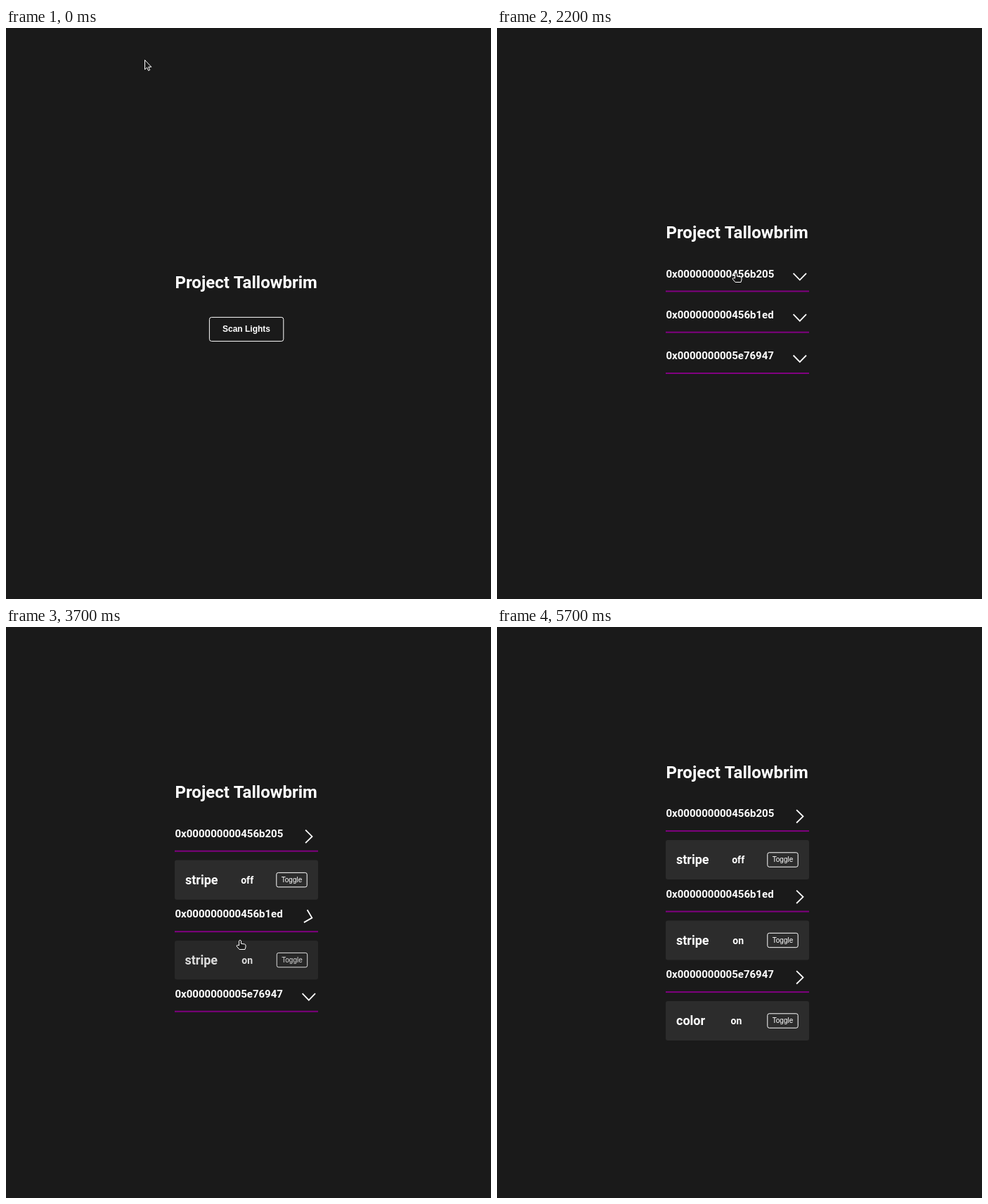
These frames come from a looping animation (690x812 px, 6.3 s). An HTML page with a canvas:

```html
<!DOCTYPE html>
<html lang="en">
<head>
<meta charset="utf-8">
<title>Light control panel</title>
<style>
  html, body { margin: 0; width: 100%; height: 100%; overflow: hidden; background: #1a1a1a; }
  canvas { display: block; }
</style>
</head>
<body>
<canvas id="stage" width="690" height="812"></canvas>
<script>
const ctx = document.getElementById('stage').getContext('2d');
const LOOP = 6300, STEP = 100, FADE = 400;
const HOVERED = 700, SCANNED = 1400;
const LEFT = 240, RIGHT = 444, TEXT_LEFT = LEFT + 0.5;
const LAST_LINE = 491, ROW = 58.3, PANEL_MIN = 50.2, PAD_MIN = 12, PAD_GROWTH = 3;
const BG = '#1a1a1a', WHITE = '#fff', ACCENT = '#800080', PANEL = '#2c2c2c';
const ROBOTO = 'Roboto, sans-serif';
const ARIAL = '"Liberation Sans", Arial, sans-serif';

const lights = [
  { id: '0x000000000456b205', effect: 'stripe', state: 'off', opens: 2450 },
  { id: '0x000000000456b1ed', effect: 'stripe', state: 'on', opens: 3485 },
  { id: '0x0000000005e76947', effect: 'color', state: 'on', opens: 4375 }
];

// Each glide takes the pointer from where it rests to x, y
const home = { x: 197, y: 45 };
const glides = [
  { from: 0, to: HOVERED, x: 311, y: 410 },
  { from: HOVERED, to: 1000, x: 322, y: 434, hand: true },
  { from: 1500, to: 1600, x: 313, y: 431 },
  { from: 1800, to: 2300, x: 341, y: 345, hand: true },
  { from: 2600, to: 3300, x: 335, y: 433, hand: true },
  { from: 3500, to: 4100, x: 320, y: 513, hand: true },
  { from: 4500, to: 4900, x: 111, y: 543 },
  { from: 5000, to: 5700, x: 104, y: -20 }
];

const clamp = v => Math.min(1, Math.max(0, v));
const mix = (a, b, k) => a + (b - a) * k;
const progress = (t, from, to) => clamp((t - from) / (to - from));
const easeInOut = k => k < 0.5 ? 4 * k ** 3 : 1 - 4 * (1 - k) ** 3;

// CSS "ease": cubic-bezier(.25, .1, .25, 1)
function ease(x) {
  if (x === 0 || x === 1) return x;
  const bezier = (a, b, s) => 3 * a * s * (1 - s) ** 2 + 3 * b * s * s * (1 - s) + s ** 3;
  let low = 0, high = 1;
  for (let i = 0; i < 20; i++) {
    const mid = (low + high) / 2;
    if (bezier(0.25, 0.25, mid) < x) low = mid; else high = mid;
  }
  return bezier(0.1, 1, low);
}

function text(str, x, y, font, color = WHITE, align = 'left') {
  ctx.font = font;
  ctx.fillStyle = color;
  ctx.textAlign = align;
  ctx.fillText(str, x, Math.round(y));
}

function roundBox(x, y, w, h, r) {
  ctx.beginPath();
  ctx.roundRect(x, y, w, h, r);
}

function outline(width, shape) {
  ctx.strokeStyle = WHITE;
  ctx.lineWidth = width;
  if (shape) ctx.stroke(shape); else ctx.stroke();
}

function drawTitle(y) {
  text('Project Tallowbrim', TEXT_LEFT, y, `700 24px ${ROBOTO}`);
}

function drawScanButton(t) {
  const hover = progress(t, HOVERED, HOVERED + 200);
  roundBox(289.4, 411.4, 105.4, 34, 3);
  ctx.globalAlpha = hover;
  ctx.fillStyle = WHITE;
  ctx.fill();
  ctx.globalAlpha = 1;
  outline(1);
  const shade = Math.round(mix(255, 26, hover));
  text('Scan Lights', 342, 432, `700 12px ${ARIAL}`, `rgb(${shade},${shade},${shade})`, 'center');
}

function drawChevron(y, open) {
  ctx.save();
  ctx.translate(430.8, y);
  ctx.rotate(-open * Math.PI / 2);
  ctx.beginPath();
  ctx.moveTo(-9.2, -4.7);
  ctx.lineTo(0, 4.7);
  ctx.lineTo(9.2, -4.7);
  outline(1.8);
  ctx.restore();
}

function drawPanel(light, top, height, open) {
  const pad = PAD_MIN + PAD_GROWTH * open, mid = top + height / 2;
  const buttonWidth = 43.4, buttonX = RIGHT - 0.8 - pad - buttonWidth;
  ctx.save();
  ctx.globalAlpha = open;
  roundBox(LEFT, top, RIGHT - LEFT, height, 3);
  ctx.fillStyle = PANEL;
  ctx.fill();

  text(light.effect, LEFT + pad, mid + 6, `700 18px ${ROBOTO}`);
  const effectEnd = LEFT + pad + ctx.measureText(light.effect).width;
  text(light.state, (effectEnd + buttonX) / 2, mid + 5, `700 14px ${ROBOTO}`, WHITE, 'center');

  roundBox(buttonX, mid - 10.2, buttonWidth, 20.4, 2.5);
  outline(1);
  text('Toggle', buttonX + buttonWidth / 2, mid + 3.4, `10px ${ARIAL}`, WHITE, 'center');
  ctx.restore();
}

// The list stays centred, so every panel lifts the first line by half its height
function drawList(t) {
  const rows = lights.map(light => {
    const open = ease(progress(t, light.opens, light.opens + FADE));
    return { light, open, height: open && PANEL_MIN + 2 * PAD_GROWTH * open };
  });
  let line = LAST_LINE - 2 * ROW - rows.reduce((sum, row) => sum + row.height, 0) / 2;
  drawTitle(line - 75.2);

  for (const { light, open, height } of rows) {
    text(light.id, TEXT_LEFT, line - 19.7, `700 15px ${ROBOTO}`);
    drawChevron(line - 20.8, open);
    ctx.fillStyle = ACCENT;
    ctx.fillRect(LEFT, line - 1, RIGHT - LEFT, 2);
    if (open) drawPanel(light, line + 12.8, height, open);
    line += ROW + height;
  }
}

const arrow = new Path2D('M.5 .5V14L3.6 11.2 5.6 15.6 7.7 14.7 5.8 10.4H9.8Z');
const hand = new Path2D('M-1.5 8V1.5Q-1.5 .5 0 .5T1.5 1.5V5.3L6.5 6Q8 6.3 8 8V10L7 13.5H-1L-4.8 9Q-5 7.4-3.4 7.4Z');

function drawPointer(t) {
  let { x, y } = home, shape = arrow;
  for (const glide of glides.filter(g => t > g.from)) {
    const k = easeInOut(progress(t, glide.from, glide.to));
    x = mix(x, glide.x, k);
    y = mix(y, glide.y, k);
    shape = glide.hand ? hand : arrow;
  }
  ctx.save();
  ctx.translate(Math.round(x), Math.round(y));
  ctx.fillStyle = BG;
  ctx.fill(shape);
  ctx.lineJoin = 'round';
  outline(1, shape);
  ctx.restore();
}

function draw(t) {
  ctx.fillStyle = BG;
  ctx.fillRect(0, 0, 690, 812);
  if (t < SCANNED) {
    drawTitle(370);
    drawScanButton(t);
  } else {
    drawList(t);
  }
  drawPointer(t);
}

// The picture changes ten times a second
const start = performance.now();
function tick() {
  const t = (performance.now() - start) % LOOP;
  draw(Math.floor(t / STEP) * STEP);
  requestAnimationFrame(tick);
}
tick();
</script>
</body>
</html>
```
